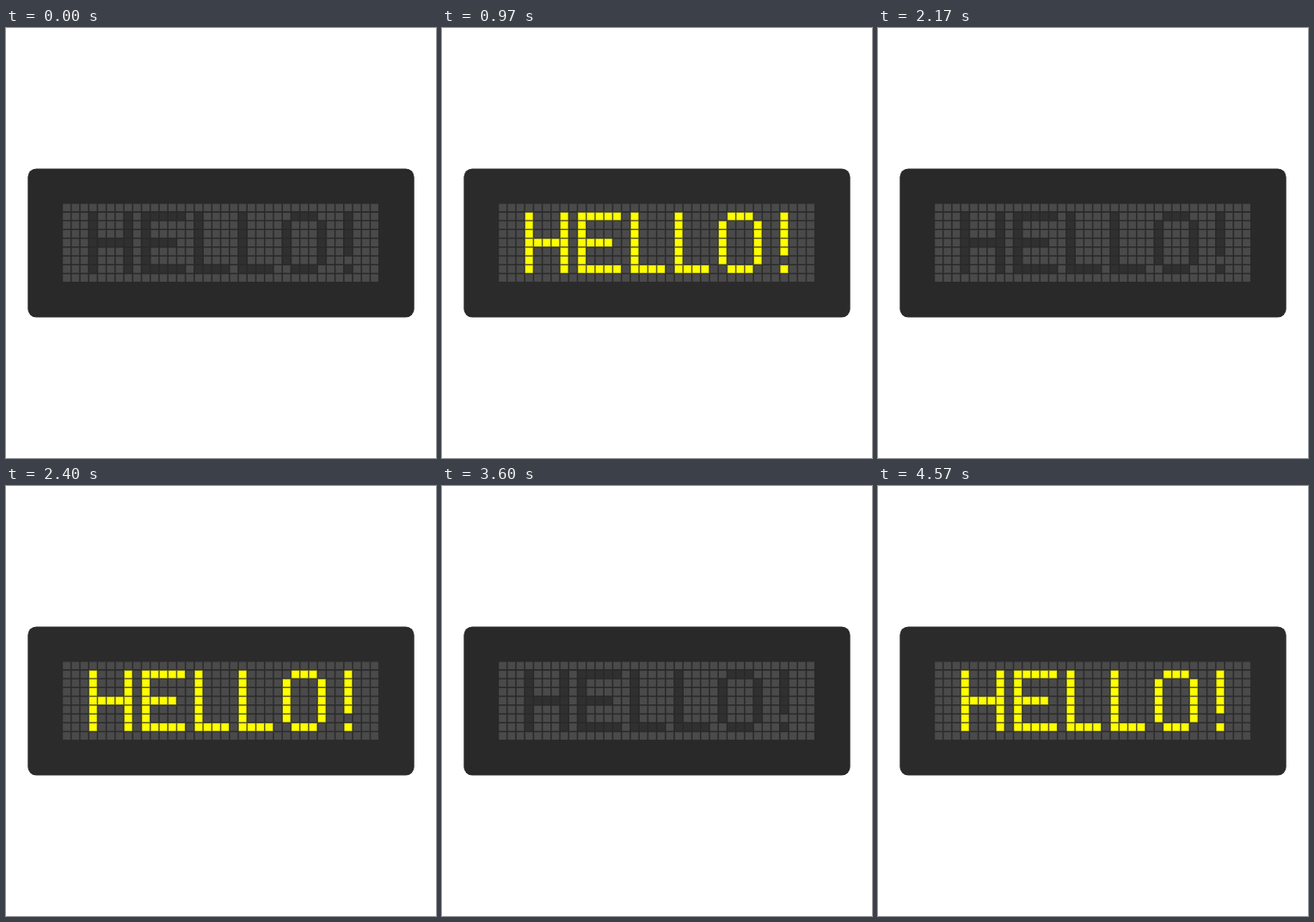
An HTML page that plays this animation: 500 by 500 pixels, repeating every 5030 ms.

```html
<!DOCTYPE html>
<html lang="en">
<head>
<meta charset="utf-8">
<title>LED sign</title>
<style>
  html, body { margin: 0; width: 100%; height: 100%; overflow: hidden; background: #fff; }
  svg { display: block; width: 100vw; height: 100vh; }
</style>
</head>
<body>
<svg viewBox="0 0 500 500" role="img" aria-label="HELLO!">
  <rect id="panel" x="25.3" y="163.4" width="449.4" height="173.2" rx="10"/>
  <path id="dots" fill="#4a4a4a"/>
  <path id="halo" fill="none" stroke="#ffff00" stroke-opacity=".22" stroke-width="1.6"/>
  <path id="word"/>
</svg>
<script>
const LOOP = 5030;
const SWITCHES = [270, 730, 970, 1470, 1700, 2170, 2400, 2900, 3130, 3600, 3870, 4330, 4570];
const COLS = 36, ROWS = 9, PITCH = 10.23, SIZE = 8.7, LEFT = 66.2, TOP = 204.4;

// The word starts at column 3, row 1 of the grid.
const WORD = [
  '#...#.#####.#....#.....###...#',
  '#...#.#.....#....#....#...#..#',
  '#...#.#.....#....#....#...#..#',
  '#####.####..#....#....#...#..#',
  '#...#.#.....#....#....#...#..#',
  '#...#.#.....#....#....#...#...',
  '#...#.#####.####.####..###...#'
];

const $ = id => document.getElementById(id);
const isLetter = (col, row) => (WORD[row - 1] || '')[col - 3] === '#';

function cell(col, row) {
  const x = (LEFT + col * PITCH).toFixed(2);
  const y = (TOP + row * PITCH).toFixed(2);
  return `M${x} ${y}h${SIZE}v${SIZE}h${-SIZE}z`;
}

let dots = '', word = '';
for (let row = 0; row < ROWS; row++) {
  for (let col = 0; col < COLS; col++) {
    if (isLetter(col, row)) word += cell(col, row);
    else dots += cell(col, row);
  }
}
$('dots').setAttribute('d', dots);
$('halo').setAttribute('d', word);
$('word').setAttribute('d', word);

function draw(time) {
  const t = time % LOOP;
  const lit = SWITCHES.filter(s => s <= t).length % 2 === 1;
  $('panel').setAttribute('fill', lit ? '#2b2b2b' : '#292929');
  $('word').setAttribute('fill', lit ? '#ffff00' : '#303030');
  $('halo').setAttribute('visibility', lit ? 'visible' : 'hidden');
}

const start = performance.now();
function tick() {
  draw(performance.now() - start);
  requestAnimationFrame(tick);
}
draw(0);
requestAnimationFrame(tick);
</script>
</body>
</html>
```
